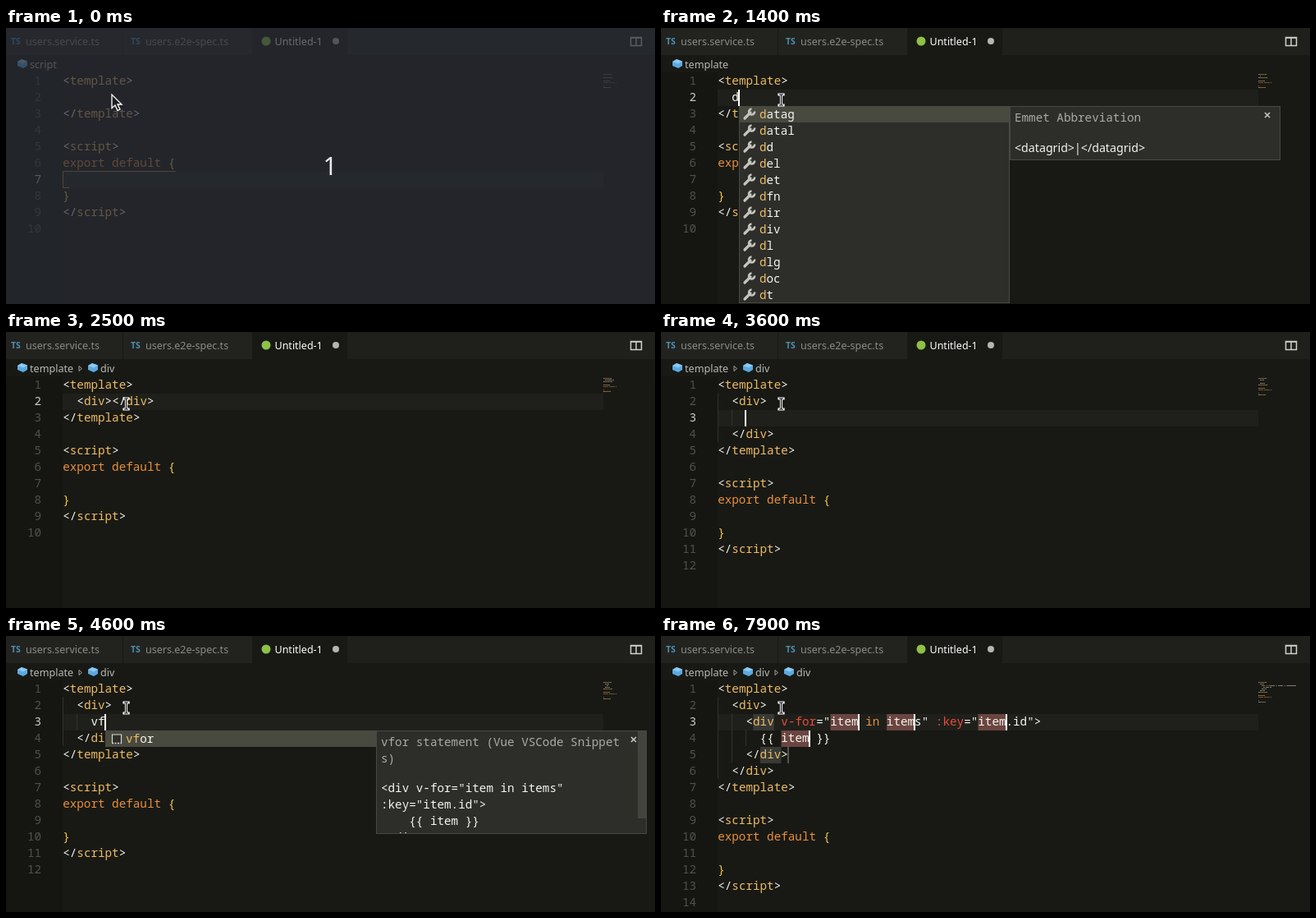
Write an HTML page that moves like this. It is 791x336 px and loops after 8 s.

```html
<!DOCTYPE html>
<html lang="en">
<head>
<meta charset="utf-8">
<title>Snippet completion</title>
<style>
  html, body { margin: 0; width: 100%; height: 100%; overflow: hidden; background: #181914; }
  #stage { display: block; width: 791px; height: 336px; }
  text { white-space: pre; }
  .mono { font: 14.28px "Noto Sans Mono", monospace; }
  .ui { font: 12.6px "Noto Sans", sans-serif; }
  .doc { font: 14.2px "Noto Sans", sans-serif; }
  .count { font: 30px "Noto Sans", sans-serif; }
</style>
</head>
<body>
<svg id="stage" viewBox="0 0 791 336"></svg>
<script>
const LOOP = 8000, LEFT = 68.7, CHAR = 8.57, ROW = 20, TOP = 54;
const C = {
  bg: '#181914', gutter: '#151611', bar: '#1f201b', tab: '#22231e', line: '#1f201b',
  text: '#f5f5ef', tag: '#edbb66', keyword: '#e88f40', attr: '#ec4a3c', brace: '#f5c74c',
  guide: '#31322c', panel: '#2d2e29', border: '#484943', picked: '#48493f',
  selection: '#6b4540', match: '#383a35', dim: '#aaaba5'
};

const escapeText = s => s.replace(/&/g, '&amp;').replace(/</g, '&lt;');
const text = (x, y, s, fill = C.text, font = 'mono', extra = '') =>
  `<text x="${x}" y="${y}" fill="${fill}" class="${font}" ${extra}>${escapeText(s)}</text>`;
const rect = (x, y, w, h, fill, extra = '') =>
  `<rect x="${x}" y="${y}" width="${w}" height="${h}" fill="${fill}" ${extra}/>`;
const stroke = (d, color, width = 1, extra = '') =>
  `<path d="${d}" fill="none" stroke="${color}" stroke-width="${width}" ${extra}/>`;
const colX = col => LEFT + CHAR * col;
const rowY = line => TOP + ROW * (line - 1);

// Document and highlighting
const tail = ['</template>', '', '<script>', 'export default {', '', '}', '<\/script>', ''];
const source = body => ['<template>', ...body, ...tail];
const syntax = /(\{\{|\}\}|export default|v-for|:key|\bin\b|(?<=<\/?)\w+|[{}])/;

function tokenColor(token, before) {
  if (/^(export default|in)$/.test(token)) return C.keyword;
  if (/^(v-for|:key)$/.test(token)) return C.attr;
  if (/^[{}]$/.test(token)) return C.brace;
  return /<\/?$/.test(before) && /^\w+$/.test(token) ? C.tag : C.text;
}

function tokens(line) {
  let col = 0;
  return line.split(syntax).filter(Boolean).map(part => {
    const token = { part, col, color: tokenColor(part, line.slice(0, col)) };
    col += part.length;
    return token;
  });
}

function codeLine(line, i) {
  return tokens(line).filter(t => t.part.trim())
    .map(t => text(colX(t.col) + .5, rowY(i + 1) + 15, t.part, t.color)).join('');
}

function minimap(lines) {
  return lines.map((line, i) => tokens(line).map(t =>
    [...t.part.matchAll(/\S+/g)].map(m =>
      rect(728 + t.col + m.index, 56 + i * 2, m[0].length, 1, t.color, 'opacity=".45"')).join('')
  ).join('')).join('');
}

function guides(body) {
  if (body.length === 1) return '';
  return body.map((line, i) => {
    const depth = line.trim() ? line.search(/\S/) / 2 : 2;
    return Array.from({ length: depth }, (_, d) =>
      rect(Math.floor(colX(d * 2)) + 1, rowY(i + 2), 1, ROW, C.guide)).join('');
  }).join('');
}

// Window parts
function chrome() {
  const tab = (x, w, label) => rect(x, 0, w, 33, C.tab) + rect(x + w, 0, 1, 33, '#171812') +
    text(x + 6, 20, 'TS', '#4d8fb5', 'ui', 'style="font-size:10.5px;font-weight:600"') +
    text(x + 24, 21, label, '#8b8c86', 'ui', 'style="font-size:12.5px"');
  return rect(0, 0, 791, 336, C.bg) + rect(0, 54, 69, 282, C.gutter) + rect(0, 0, 791, 33, C.bar) +
    tab(0, 142, 'users.service.ts') + tab(146, 154, 'users.e2e-spec.ts') + rect(143, 0, 3, 33, C.tab) +
    rect(301, 0, 115, 33, C.bg) +
    '<circle cx="317" cy="16" r="5.5" fill="#8dc149"/><circle cx="402" cy="16" r="4" fill="#b5b6b0"/>' +
    text(327.5, 21, 'Untitled-1', '#fff', 'ui', 'style="font-size:12.5px"') +
    stroke('M761.5 11.5h13v10h-13zM768 11v10M761 12h14', '#d0d0ca', 1.5);
}

function breadcrumbs(names) {
  let x = 14;
  return names.map((name, i) => {
    const chevron = i ? stroke(`M${x - 11} 41.5l3.5 3l-3.5 3z`, '#a5a6a0') : '';
    const cube = `<g transform="translate(${x} 38)">` +
      '<path d="M0 3L5 0l7 2.500v5.500L7 11L0 8z" fill="#5ca9df"/>' +
      '<path d="M0 3L5 0l7 2.500L7 5.500z" fill="#8bcaf2"/></g>';
    const label = text(x + 15, 48.5, name, '#b8b9b3', 'ui');
    x += name === 'template' ? 86 : 50;
    return chevron + cube + label;
  }).join('');
}

function closeIcon(x, y) {
  return stroke(`M${x - 3} ${y - 3}l6 6m0 -6l-6 6`, '#c4c5bf', 1.6);
}

function itemIcon(kind, x, y) {
  return kind === 'emmet'
    ? stroke(`M${x} ${y + 11}l7 -7`, '#c5c5bf', 3.2, 'stroke-linecap="round"') +
      stroke(`M${x + 12} ${y + 2.5}a3.500 3.500 0 1 1 -3.500 -3`, '#c5c5bf', 2.6)
    : rect(x + 1.5, y + 1, 11, 10, C.panel) +
      stroke(`M${x + 1.5} ${y + 11}v-10h11v10`, '#d5d5cf', 1.2) +
      stroke(`M${x + 1} ${y + 11.5}h12`, '#d5d5cf', 1.4, 'stroke-dasharray="2 1.500"');
}

function popup({ kind, items, word, col, line, title, detail, scrollbar }) {
  const x = Math.round(colX(col) + .7), y = rowY(line) + 22, w = 330;
  const snippet = kind === 'snippet', docX = x + w, docH = snippet ? 125 : 65;
  const rows = items.map((item, i) => {
    const top = y + i * ROW;
    return (i ? '' : rect(x + 1, top, w - 2, ROW - 1, C.picked)) + itemIcon(kind, x + 7, top + 3) +
      text(x + 25, top + 14, word, C.tag) +
      text(x + 25 + CHAR * word.length, top + 14, item.slice(word.length));
  }).join('');
  const titleText = title.map((s, i) => text(6, 19 + i * ROW, s, C.dim)).join('');
  const detailText = detail.map((s, i) =>
    text(6, (snippet ? 75 : 55.5) + i * ROW, s, C.text, snippet ? 'mono' : 'doc')).join('');
  return rect(x + .5, y - .5, w - 1, items.length * ROW - 1, C.panel, `stroke="${C.border}"`) + rows +
    rect(docX + .5, y - .5, w - 1, docH, C.panel, `stroke="${C.border}"`) +
    `<svg x="${docX}" y="${y - 1}" width="${w}" height="${docH}">` + titleText + detailText +
    (scrollbar ? rect(319, 1, 10, 106, '#43443e') : '') + '</svg>' + closeIcon(docX + 314, y + 10);
}

function pointer([shape, x, y]) {
  if (shape === 'arrow') {
    return `<path d="M${x} ${y}v16.500l4 -3.500l3 6.500l3 -1.500l-3 -6h5z" fill="#1c1e20" stroke="#fff" stroke-width="1.3"/>`;
  }
  const beam = `M${x - 2.5} ${y - 7}h5m-2.5 0v13m-2.5 0h5`;
  return stroke(beam, '#fff', 3.2, 'stroke-linecap="square"') + stroke(beam, '#111', 1.2);
}

const caret = (line, col, color = '#fff') => rect(Math.floor(colX(col)), rowY(line) + 1, 2, ROW, color);
const span = (line, col, length, fill) =>
  rect(colX(col) + .7, rowY(line) + 1, CHAR * length, ROW, fill);

function draw(s) {
  const lines = source(s.body);
  const numbers = lines.map((_, i) => text(43, rowY(i + 1) + 15, String(i + 1),
    i + 1 === s.line ? '#c8c9c3' : '#50514b', 'mono', 'text-anchor="end"')).join('');
  const stops = [[3, 16], [3, 24], [3, 37], [4, 9]];
  return chrome() + breadcrumbs(s.crumbs) +
    rect(69, rowY(s.line) + 1, 659, ROW, C.line) + guides(s.body) +
    (s.matches ? span(3, 5, 3, C.match) + span(5, 6, 3, C.match) : '') +
    (s.fields ? stops.map(([l, c]) => span(l, c, 4, C.selection)).join('') + caret(5, 10, '#54554f') : '') +
    numbers + lines.map(codeLine).join('') + minimap(lines) +
    (s.scope ? stroke('M207 174.500H69.500V194.500H77', '#a88a45') : '') +
    (s.on ? (s.fields ? stops.map(([l, c]) => caret(l, c + 4)).join('') : caret(s.line, s.col)) : '') +
    (s.popup ? popup(s.popup) : '') +
    (s.countdown ? rect(0, 0, 791, 336, '#282c35', 'opacity=".7"') +
      text(395, 179, '1', '#e8e9ea', 'count', 'text-anchor="middle"') : '') +
    pointer(s.pointer);
}

// Timeline: each step changes only the listed properties
const emmet = (word, items, tag) => ({
  kind: 'emmet', items, word, col: 2 + word.length, line: 2,
  title: ['Emmet Abbreviation'], detail: [`<${tag}>|</${tag}>`]
});
const snippet = (word, items = ['vfor'], scrollbar = true) => ({
  kind: 'snippet', items, word, scrollbar, col: 4 + word.length, line: 3,
  title: ['vfor statement (Vue VSCode Snippet', 's)'],
  detail: ['<div v-for="item in items"', ':key="item.id">', '    {{ item }}', '</div>']
});
const inDiv = inner => ['  <div>', ...inner.map(s => '    ' + s), '  </div>'];
const typed = (word, col) => ({ body: inDiv([word]), col, on: true });

const dItems = 'datag datal dd del det dfn dir div dl dlg doc dt'.split(' ');
const vItems = 'vfor vanim vanimhook var vclass vclass-obj video vmodel von vsrc vstyle'.split(' ');
const loopBody = ['<div v-for="item in items" :key="item.id">', '  {{ item }}', '</div>'];

const steps = [
  [0, { body: [''], line: 7, col: 0, crumbs: ['script'], scope: true, countdown: true, pointer: ['arrow', 129, 81] }],
  [100, { countdown: false, pointer: ['beam', 130, 82] }],
  [500, { body: ['  '], line: 2, col: 2, on: true, scope: false, pointer: ['beam', 136, 85] }],
  [600, { pointer: ['beam', 142, 87] }],
  [700, { crumbs: ['template'], pointer: ['beam', 145, 88] }],
  [800, { pointer: ['beam', 146.5, 88] }],
  [1000, { on: false }],
  [1300, { body: ['  d'], col: 3, on: true }],
  [1400, { popup: emmet('d', dItems, 'datagrid') }],
  [1500, { body: ['  di'], col: 4 }],
  [1600, { popup: emmet('di', ['dir', 'div'], 'dir') }],
  [1700, { body: ['  div'], col: 5, popup: emmet('div', ['div'], 'div') }],
  [2000, { body: ['  <div></div>'], col: 7, popup: null }],
  [2500, { on: false, crumbs: ['template', 'div'] }],
  [2700, { ...typed('', 4), line: 3 }],
  [3200, { on: false }],
  [3600, { on: true }],
  [4100, { ...typed('v', 5), popup: snippet('v', vItems) }],
  [4500, typed('vf', 6)],
  [4600, { popup: snippet('vf') }],
  [4800, { ...typed('vfo', 7), popup: snippet('vfo') }],
  [5000, { ...typed('vfor', 8), popup: snippet('vfor', ['vfor'], false) }],
  [5500, { on: false }],
  [6000, { on: true }],
  [6400, { on: false }],
  [6700, { body: inDiv(loopBody), popup: null }],
  [6800, { fields: true }],
  [7100, { crumbs: ['template', 'div', 'div'], matches: true }],
  [7900, { on: true }]
];

let state = {};
const scenes = steps.map(([at, change]) => ({ at, markup: draw(state = { ...state, ...change }) }));
const stage = document.getElementById('stage');
const start = performance.now();
let shown;

function tick() {
  const time = (performance.now() - start) % LOOP;
  const scene = scenes.findLast(s => s.at <= time);
  if (scene !== shown) stage.innerHTML = (shown = scene).markup;
  requestAnimationFrame(tick);
}
tick();
</script>
</body>
</html>
```
